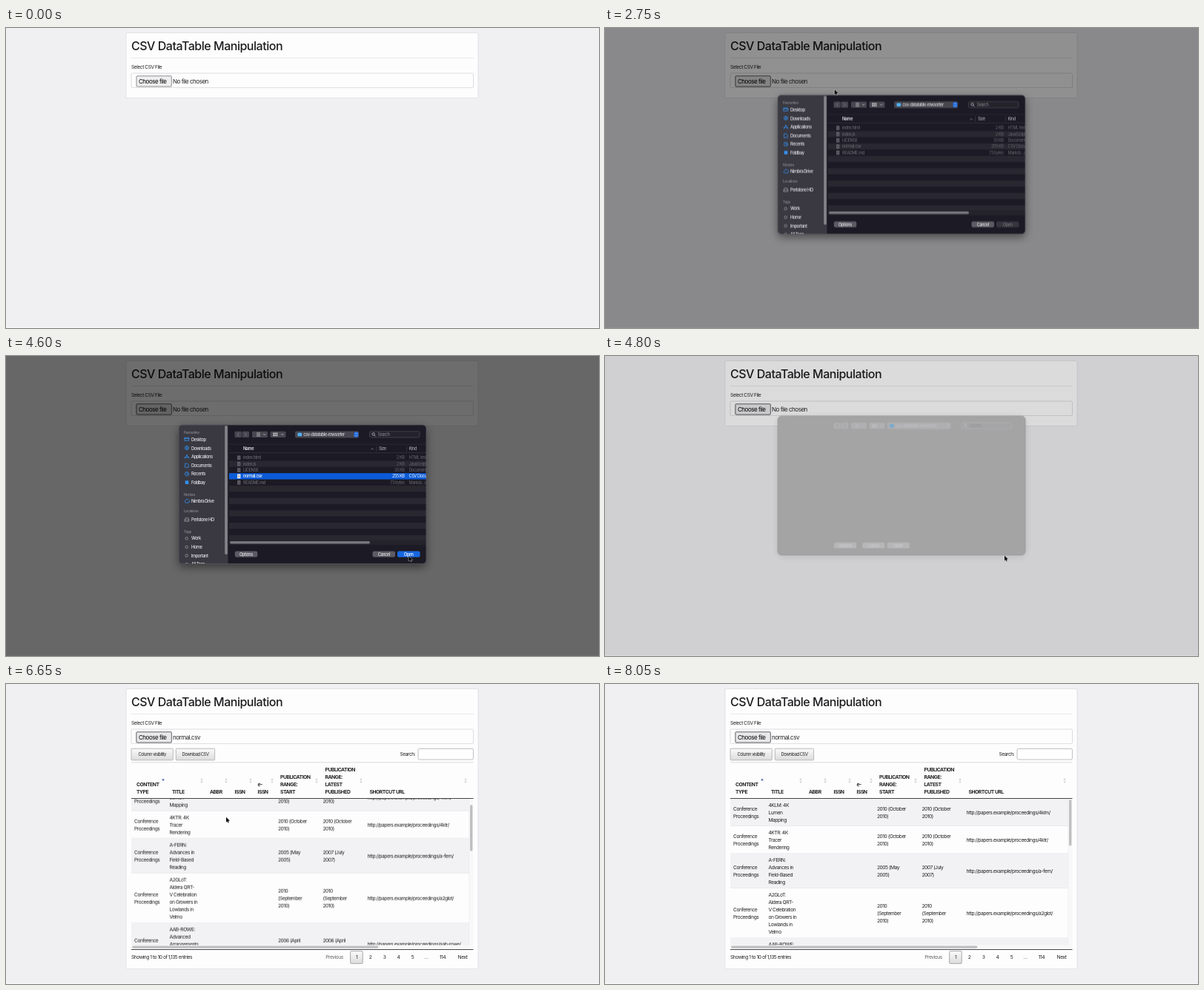
An HTML page for the animation above (8600 ms loop, 800 px wide and 405 px high).

```html
<!DOCTYPE html>
<html lang="en">
<head>
<meta charset="utf-8">
<title>CSV DataTable Manipulation</title>
<style>
  html, body { margin: 0; width: 100%; height: 100%; overflow: hidden; background: #f0eff2; }
  svg { display: block; width: 800px; height: 405px; font-family: Inter, "Liberation Sans", sans-serif; letter-spacing: -.03em; }
  text { white-space: pre; }
  #cursor, #shade, #dialog, #ghost, #table, #empty, #chosen, #focus, #selection, #rows, #thumb, #press {
    animation: 8600ms linear infinite;
  }
  #cursor { animation-name: cursor; }
  #shade { animation-name: shade; }
  #dialog { animation-name: dialog; }
  #ghost { animation-name: ghost; }
  #table { animation-name: table; }
  #empty { animation-name: empty; }
  #chosen { animation-name: chosen; }
  #focus { animation-name: focus; }
  #press { animation-name: press; }
  #selection { animation-name: selection; }
  #rows { --end: -70px; --mid: -20px; animation-name: scroll; }
  #thumb { --end: 23px; --mid: 7px; animation-name: scroll; }

  @keyframes cursor {
    0%, 2.32% { transform: translate(49px, 231px); opacity: 0; }
    2.326% { transform: translate(49px, 231px); opacity: 1; animation-timing-function: cubic-bezier(.35, .1, .4, 1); }
    9.884%, 24.3% { transform: translate(197.5px, 75px); }
    24.419%, 25.581% { transform: translate(198.5px, 73.3px); animation-timing-function: ease-in; }
    31.977% { transform: translate(309.5px, 83px); }
    34.884% { transform: translate(345px, 103px); animation-timing-function: ease-out; }
    41.3%, 45.349% { transform: translate(388px, 160px); animation-timing-function: ease-in-out; }
    52.326%, 55.233% { transform: translate(543.5px, 270px); }
    55.814% { transform: translate(539px, 269.5px); animation-timing-function: cubic-bezier(.3, .1, .3, 1); }
    65.116%, 66.86% { transform: translate(298px, 180.5px); }
    68.023%, 90.698% { transform: translate(297px, 179.7px); opacity: 1; animation-timing-function: ease-in; }
    93.5% { transform: translate(23px, 89px); opacity: 1; }
    93.6%, 100% { transform: translate(23px, 89px); opacity: 0; }
  }
  @keyframes shade {
    0%, 28.2% { opacity: 0; }
    31.977% { opacity: .43; }
    34.302%, 54.07% { opacity: .57; }
    55.814% { opacity: .135; }
    56.977%, 100% { opacity: 0; }
  }
  @keyframes dialog {
    0%, 29.07% { opacity: 0; transform: translateY(-14px); animation-timing-function: ease-out; }
    31.977% { opacity: 1; transform: translateY(-2.4px); }
    34.302%, 54.651% { opacity: 1; transform: none; }
    55.814%, 100% { opacity: 0; transform: translateY(-12px); }
  }
  @keyframes ghost {
    0%, 55.1% { opacity: 0; }
    55.814% { opacity: 1; }
    56.977%, 100% { opacity: 0; }
  }
  @keyframes table { 0%, 69.76% { opacity: 0; } 69.767%, 100% { opacity: 1; } }
  @keyframes empty { 0%, 56.39% { opacity: 1; } 56.395%, 100% { opacity: 0; } }
  @keyframes chosen { 0%, 56.39% { opacity: 0; } 56.395%, 100% { opacity: 1; } }
  @keyframes focus { 0%, 16.85% { opacity: 0; } 16.86%, 100% { opacity: 1; } }
  @keyframes press { 0%, 16.85% { opacity: 0; } 17.442%, 18.2% { opacity: .12; } 19.186%, 100% { opacity: 0; } }
  @keyframes selection { 0%, 41.85% { opacity: 0; } 41.86%, 100% { opacity: 1; } }
  @keyframes scroll {
    0%, 74.419% { transform: none; animation-timing-function: ease-in; }
    77.326% { transform: translateY(var(--mid)); animation-timing-function: ease-out; }
    80.233%, 84.302% { transform: translateY(var(--end)); animation-timing-function: ease-in-out; }
    87.791%, 100% { transform: none; }
  }
</style>
</head>
<body>
<svg viewBox="0 0 800 405">
  <defs>
    <linearGradient id="grey" x2="0" y2="1"><stop stop-color="#fafafa"/><stop offset="1" stop-color="#dcdcdc"/></linearGradient>
    <clipPath id="sheet"><rect x="233" y="93" width="334" height="187.5" rx="5"/></clipPath>
    <clipPath id="view"><rect x="169" y="155" width="456" height="197.5"/></clipPath>
    <filter id="blur" x="-20%" y="-20%" width="140%" height="150%"><feGaussianBlur stdDeviation="6"/></filter>
  </defs>
  <rect width="800" height="405" fill="#f0eff2"/>
  <rect y="404" width="800" height="1" fill="#fafafb"/>
  <rect x="162" y="6.5" width="475" height="88" rx="2" fill="#fefdfe" stroke="#dfdee1" stroke-width=".8"/>
  <g id="table"></g>
  <g id="form"></g>
  <rect id="shade" width="800" height="405" opacity="0"/>
  <g id="ghost"></g>
  <g id="dialog"></g>
  <path id="cursor" d="M0 0V6.9L1.6 5.4 2.6 7.7 3.8 7.2 2.8 5 5 4.9Z" stroke="#fff" stroke-width=".8" paint-order="stroke"/>
</svg>
<script>
(() => {
  const put = (id, ...parts) => document.getElementById(id).innerHTML = parts.flat(Infinity).join('');
  const text = (x, y, s, size = 6.7, fill = '#222', weight = 400, anchor = 'start') =>
    `<text x="${x}" y="${y}" font-size="${size}" fill="${fill}" font-weight="${weight}" text-anchor="${anchor}">${s}</text>`;
  const box = (x, y, w, h, fill, rx = 0, stroke = 'none') =>
    `<rect x="${x}" y="${y}" width="${w}" height="${h}" fill="${fill}" rx="${rx}" stroke="${stroke}" stroke-width=".8"/>`;
  const line = (d, stroke, width = .8) =>
    `<path d="${d}" fill="none" stroke="${stroke}" stroke-width="${width}" stroke-linecap="round" stroke-linejoin="round"/>`;
  const group = (id, ...parts) => `<g id="${id}">${parts.flat(Infinity).join('')}</g>`;
  const lines = (x, y, list, ...style) => list.map((s, i) => text(x, y + i * 10, s, ...style)).join('');

  put('form',
    text(169, 29.7, 'CSV DataTable Manipulation', 16, '#1c1c1e', 500),
    box(169, 40, 461.5, .8, '#e3e2e5'),
    text(169, 54.7, 'Select CSV File'),
    box(169, 61, 461.5, 19.6, '#fefdfe', 1.5, '#d3d2d6'),
    box(176, 64.8, 47.3, 14.2, '#efeff0', 1, '#77777a'),
    group('focus', box(176, 64.8, 47.3, 14.2, '#e8e8ea', 1, '#5c5c60')),
    group('press', box(176, 64.8, 47.3, 14.2, '#000', 1)),
    text(179, 74.9, 'Choose file', 8, '#000'),
    group('empty', text(225, 74.9, 'No file chosen', 8)),
    group('chosen', text(225, 74.9, 'normal.csv', 8)));

  // Results table
  const heads = [
    [176, ['CONTENT', 'TYPE'], 212], [224, ['TITLE'], 264], [275, ['ABBR'], 297], [308.5, ['ISSN'], 330],
    [339.5, ['e-', 'ISSN'], 359], [370, ['PUBLICATION', 'RANGE:', 'START'], 419],
    [430.5, ['PUBLICATION', 'RANGE:', 'LATEST', 'PUBLISHED'], 479], [490.5, ['SHORTCUT URL'], 620]];
  const october = ['2010 (October', '2010)'], september = ['2010', '(September', '2010)'];
  const records = [
    [['4KLM: 4K', 'Lumen', 'Mapping'], october, october, '4klm'],
    [['4KTR: 4K', 'Tracer', 'Rendering'], october, october, '4ktr'],
    [['A-FERN:', 'Advances in', 'Field-Based', 'Reading'], ['2005 (May', '2005)'], ['2007 (July', '2007)'], 'a-fern'],
    [['A2GLoT:', 'Aldera QRT-', 'V Celebration', 'on Growers in', 'Lowlands in', 'Velmo'], september, september, 'a2glot'],
    [['AAB-ROWE:', 'Advanced', 'Arrangements', 'for Outdoor', 'Workshops'], ['2006 (April', '2006)'], ['2006 (April', '2006)'], 'aab-rowe'],
    [['ABLT: Basic', 'Layout', 'Tooling'], october, october, 'ablt']];

  const arrows = (x, i) => i
    ? `<path d="M${x - 1.7} 129.7h3.4l-1.7-2.6zm0 1.6h3.4l-1.7 2.6z" fill="#d0d0d4"/>`
    : `<path d="M${x - 1.8} 130.2h3.6l-1.8-2.8z" fill="#3f5fb0"/>`;

  let rowTop = 155;
  const rows = records.map(([title, from, to, slug], i) => {
    const h = title.length * 10 + 7, y = rowTop, mid = y + h / 2;
    const cell = (x, list) => lines(x, mid + 7.5 - list.length * 5, list);
    rowTop += h;
    return box(169, y, 456, h, i % 2 ? '#fefdfe' : '#f2f1f3') + box(169, y + h - .4, 456, .7, '#dddce0')
      + cell(173, ['Conference', 'Proceedings']) + cell(220.5, title) + cell(367, from) + cell(427.5, to)
      + cell(487.5, [`http://papers.example/proceedings/${slug}/`]);
  });
  const pages = [[473, '1'], [491.5, '2'], [510.5, '3'], [529.5, '4'], [548.5, '5'], [567, '…'], [589, '114'], [616, 'Next']];

  put('table',
    box(162, 6.5, 475, 378, '#fefdfe', 2, '#dfdee1'),
    box(169, 87.2, 56.3, 15.6, 'url(#grey)', 1, '#a9a9ac'),
    text(197.2, 97.2, 'Column visibility', 5.9, '#222', 400, 'middle'),
    box(229.3, 87.2, 52.3, 15.6, 'url(#grey)', 1, '#a9a9ac'),
    text(255.5, 97.2, 'Download CSV', 5.9, '#222', 400, 'middle'),
    text(531.5, 97.4, 'Search:'),
    box(556, 87.4, 74.4, 14.6, '#fff', 1.5, '#aeaeb2'),
    box(169, 105.5, 461.5, .8, '#d2d1d5'),
    heads.map(([x, list, sort], i) => lines(x, 157.7 - list.length * 10, list, 6.8, '#222', 700) + arrows(sort, i)),
    `<g clip-path="url(#view)">${group('rows', rows)}</g>`,
    box(169, 154, 461.5, .9, '#333'),
    box(624.8, 155, 5.6, 198, '#f8f8f9'), box(169, 352.5, 461.5, 5, '#f8f8f9'),
    box(624.6, 155, .5, 198, '#e4e4e6'),
    group('thumb', box(626, 156, 3.4, 62.5, '#bfbfc1', 1.7)),
    box(170, 353.4, 332.5, 3.4, '#bfbfc1', 1.7),
    box(169, 358, 461.5, .9, '#333'),
    text(169, 371.4, 'Showing 1 to 10 of 1,135 entries'),
    text(443, 371.4, 'Previous', 6.7, '#666', 400, 'middle'),
    box(464.6, 360.6, 16.6, 16.8, 'url(#grey)', 1, '#979799'),
    pages.map(([x, s]) => text(x, 371.4, s, 6.7, '#222', 400, 'middle')));

  // File dialog
  const button = (x, s, fill, ink) => box(x, 263.4, 30.5, 8.2, fill, 2) + text(x + 15.2, 269.6, s, 5.7, ink, 500, 'middle');
  const tools = (dx, fill, ink, field) => [
    box(308.5, 101.8, 9.4, 8.2, fill, 1.5), box(318.6, 101.8, 9.4, 8.2, fill, 1.5),
    line('M314 104l-1.7 1.9 1.7 1.9M322.5 104l1.7 1.9-1.7 1.9', '#8b8a92', .7),
    box(332, 101.8, 21, 8.2, fill, 1.5), box(356.5, 101.8, 21, 8.2, fill, 1.5),
    line('M338.5 104h4M338.5 106h4M338.5 108h4M347.3 105.3l1.3 1.3 1.3-1.3M371.5 105.3l1.3 1.3 1.3-1.3', ink, .7),
    [0, 2.2, 4.4].map(x => box(360.3 + x, 103.6, 1.6, 1.9, ink) + box(360.3 + x, 106.3, 1.6, 1.9, ink)),
    `<g transform="translate(${-dx})">`,
    box(390, 101.5, 86, 9, fill, 2), box(393.5, 103.7, 5.6, 4.6, '#4fb1f5', .8),
    text(401.3, 108, 'csv-datatable-rowsorter', 5.7, ink, 500),
    box(469.4, 102.4, 6, 7.2, dx ? fill : '#1f6be0', 1.5),
    line('M471.2 105l1.2-1.3 1.2 1.3M471.2 107l1.2 1.3 1.2-1.3', ink, .6),
    box(490.5, 101.8, 67.5, 8.2, field, 2, fill),
    `<circle cx="495.6" cy="105.4" r="1.7" fill="none" stroke="${ink}" stroke-width=".7"/>`, line('M496.9 106.8l1.4 1.4', ink, .7),
    text(501.5, 108, 'Search', 5.7, '#8c8b92'), '</g>'];

  const blue = '#3291f2', pale = '#e4e3e8';
  const icons = [
    'M241.2 110.3h5.6v4h-5.6zM241.2 111.6h5.6',
    'M244 122.2v3M242.8 124l1.2 1.3 1.2-1.3M246.6 124a2.6 2.6 0 1 1-5.2 0a2.6 2.6 0 1 1 5.2 0',
    'M244 133.4l-2.6 5M244 133.4l2.6 5M241.2 136.7h5.6',
    'M242 145.2h2.8l1.4 1.4v3.8h-4.2z',
    'M244 157.6v1.8h1.3M246.6 159.2a2.6 2.6 0 1 1-5.2 0a2.6 2.6 0 1 1 5.2 0'];
  const places = ['Desktop', 'Downloads', 'Applications', 'Documents', 'Recents', 'Foldbay'];
  const files = [
    ['index.html', '2 KB', 'HTML text'], ['index.js', '2 KB', 'JavaScript'], ['LICENSE', '35 KB', 'Document'],
    ['normal.csv', '255 KB', 'CSV Document'], ['README.md', '73 bytes', 'Markdo...d']];
  const pitch = 8.35, dim = '#66656d';
  const entry = ([name, size, kind], i, ink = dim) => {
    const y = 139.4 + i * pitch;
    return box(312, y - 4.9, 4.4, 5.6, ink, .6) + line(`M313 ${y - 2.8}h2.4M313 ${y - 1.2}h2.4`, '#2a2930', .5)
      + text(320, y, name, 5.7, ink, 500) + text(537.5, y, size, 5.7, ink, 400, 'end') + text(543.5, y, kind, 5.7, ink);
  };
  const side = (y, s) => text(240, y, s, 5, '#7d7c84', 600);
  const item = (y, s) => text(250, y, s, 5.8, pale, 500);

  put('dialog',
    '<rect x="233" y="97" width="334" height="188" rx="6" opacity=".45" filter="url(#blur)"/>',
    '<g clip-path="url(#sheet)">',
    box(233, 93, 334, 188, '#1c1a24'), box(233, 93, 66.5, 188, '#3a3941'),
    side(105.3, 'Favourites'),
    places.map((s, i) => item(115 + i * 11.6, s)),
    icons.map(d => line(d, blue)),
    box(241.7, 168.3, 4.6, 4.6, blue),
    side(188.7, 'Nimbra'), item(198.3, 'Nimbra Drive'),
    line('M242.3 198a1.6 1.6 0 0 1 0-3.1a2.2 2.2 0 0 1 4.1-.4a1.8 1.8 0 0 1 0 3.5z', blue),
    side(211.2, 'Locations'), item(223.4, 'Perlstone HD'),
    line('M241.2 221.2l1-2.7h3.6l1 2.7v2h-5.6zM241.2 221.2h5.6', '#a3a2a9', .7),
    side(238.7, 'Tags'),
    ['Work', 'Home', 'Important', 'All Tags...'].map((s, i) => item(248.4 + i * 11.6, s)
      + `<circle cx="243.7" cy="${246.3 + i * 11.6}" r="1.8" fill="none" stroke="#a3a2a9" stroke-width=".7"/>`),
    box(295.2, 94, 3.6, 174, '#85848b', 1.8),
    tools(0, '#48464f', '#d8d7dc', '#24222b'),
    box(299.5, 118.8, 268, .6, '#34323b'), box(301, 130.5, 266, .6, '#3c3a43'),
    text(320, 127.3, 'Name', 5.7, pale, 600), text(503, 127.3, 'Size', 5.7, '#bcbbc2'), text(543.5, 127.3, 'Kind', 5.7, '#bcbbc2'),
    line('M492.7 126l1.4-1.3 1.4 1.3', '#aaa', .6), box(499, 121.5, .6, 7, '#45434c'), box(540, 121.5, .6, 7, '#45434c'),
    [1, 3, 5, 7, 9, 11, 13].map(i => box(301, 133.1 + i * pitch, 266, pitch, '#29272f')),
    files.map((f, i) => entry(f, i)),
    box(299.5, 248.7, 268, 6.5, '#24222a'), box(302, 250.1, 189, 3.4, '#77767d', 1.7),
    button(308.8, 'Options', '#5c5a63', pale), button(494.5, 'Cancel', '#5c5a63', pale), button(528, 'Open', '#36343d', '#706f77'),
    group('selection', box(301, 133.1 + 3 * pitch, 266, pitch, '#0b5bd9'), entry(files[3], 3, '#fff'), button(528, 'Open', '#1667e2', '#fff')),
    '</g>',
    box(233, 93, 334, 187.5, 'none', 5, '#5a5960'));

  put('ghost', '<g transform="translate(0 -11.8)">',
    '<rect x="233" y="95" width="334" height="187" rx="6" opacity=".12" filter="url(#blur)"/>',
    box(233, 93, 334, 187.5, '#a3a3a4', 5, '#989899'),
    '<g opacity=".55">', tools(9.5, '#bababc', '#d8d8da', '#a6a6a8'),
    button(308.8, 'Options', '#c6c6c8', '#eee'), button(347, 'Cancel', '#c6c6c8', '#eee'), button(380.5, 'Open', '#c6c6c8', '#eee'),
    '</g></g>');
})();
</script>
</body>
</html>
```
